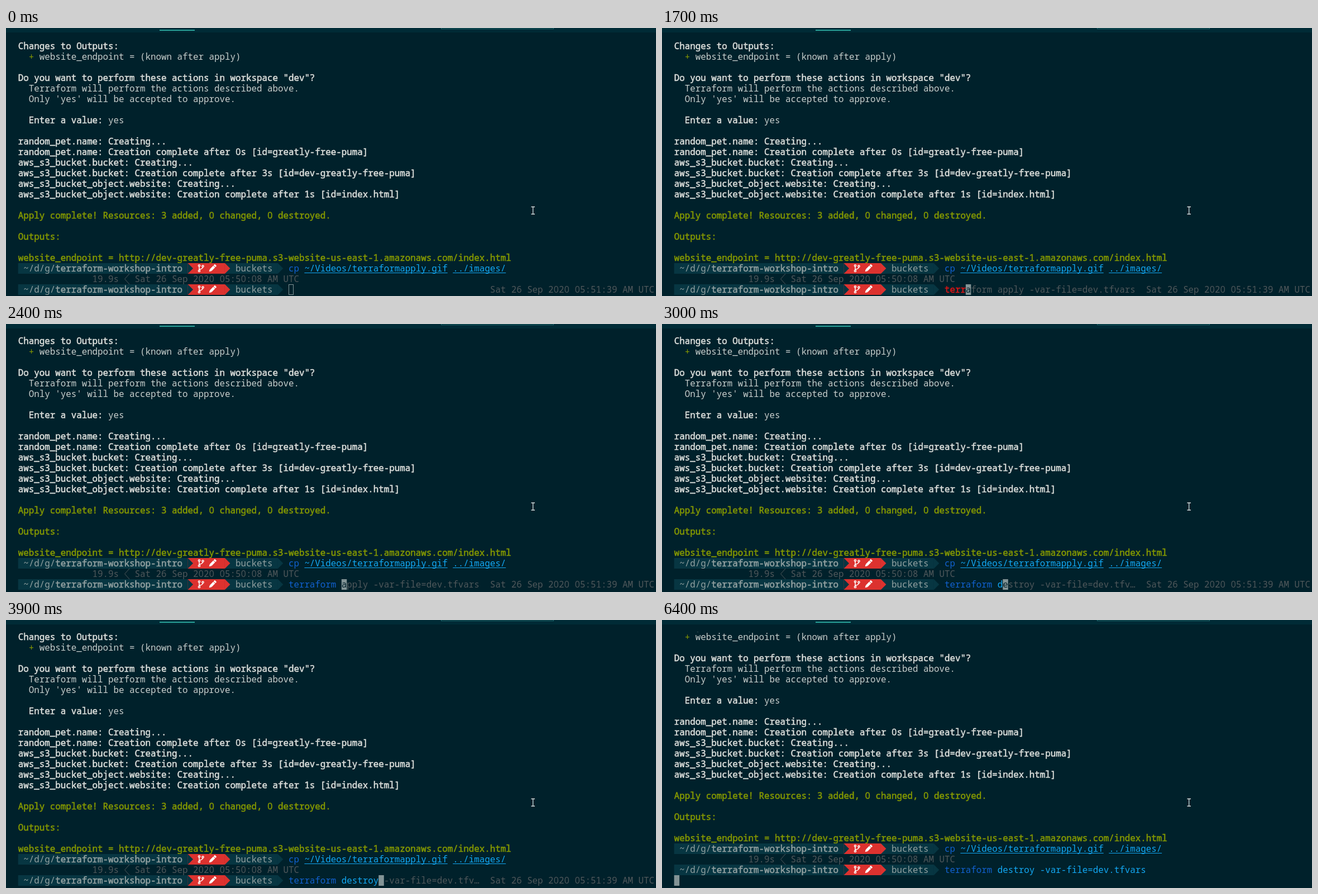
An HTML page with a canvas for the animation above (8 s loop, 1164 by 481 pixels).

```html
<!DOCTYPE html>
<html lang="en">
<head>
<meta charset="utf-8">
<title>Terminal</title>
<style>
  html, body { margin: 0; width: 100%; height: 100%; overflow: hidden; background: #00212b; }
  canvas { display: block; }
</style>
</head>
<body>
<canvas id="stage" width="1164" height="481"></canvas>
<script>
const ctx = document.getElementById('stage').getContext('2d');
const LOOP = 8000, LEFT = 21.7, CELL = 9.494, ROW = 19, BASELINE = 15;
const SIZE = CELL / 0.6;
const COLOR = {
  back: '#00212b', bar: '#002b36', teal: '#2aa198', text: '#c9cfcd', bold: '#dcdedb',
  green: '#859900', segment: '#073642', path: '#93a1a1', red: '#dc322f', white: '#ffffff',
  command: '#1161d0', argument: '#12a8f4', error: '#dc1414', dim: '#50585b', cursor: '#839496'
};
const STAMP = 'Sat 26 Sep 2020 05:51:39 AM UTC';
const APPLY = 'terraform apply -var-file=dev.tfvars';
const DESTROY = 'terraform destroy -var-file=dev.tfvars';
const SHORT_DESTROY = 'terraform destroy -var-file=dev.tfv…';

const OUTPUT = [
  ['bold', 'Changes to Outputs:'],
  ['text', '    website_endpoint = (known after apply)'],
  [],
  ['bold', 'Do you want to perform these actions in workspace "dev"?'],
  ['text', '  Terraform will perform the actions described above.'],
  ['text', "  Only 'yes' will be accepted to approve."],
  [],
  ['bold', '  Enter a value:'],
  [],
  ['bold', 'random_pet.name: Creating...'],
  ['bold', 'random_pet.name: Creation complete after 0s [id=greatly-free-puma]'],
  ['bold', 'aws_s3_bucket.bucket: Creating...'],
  ['bold', 'aws_s3_bucket.bucket: Creation complete after 3s [id=dev-greatly-free-puma]'],
  ['bold', 'aws_s3_bucket_object.website: Creating...'],
  ['bold', 'aws_s3_bucket_object.website: Creation complete after 1s [id=index.html]'],
  [],
  ['green', 'Apply complete! Resources: 3 added, 0 changed, 0 destroyed.'],
  [],
  ['green', 'Outputs:'],
  [],
  ['green', 'website_endpoint = http://dev-greatly-free-puma.s3-website-us-east-1.amazonaws.com/index.html']
];

// [time, number of typed characters]
const TYPING = [[0, 0], [1000, 1], [1400, 2], [1500, 3], [1700, 4], [1800, 5], [1900, 6],
  [2100, 7], [2200, 8], [2300, 9], [2400, 10], [3000, 11], [3400, 14], [3600, 15],
  [3700, 16], [3900, 17], [4600, 38]];

const colX = col => LEFT + col * CELL;
const rowY = row => 23 + row * ROW;

function rect(x, y, w, h, color) {
  ctx.fillStyle = color;
  ctx.fillRect(x, y, w, h);
}

// The zero is plain, so it comes from a face without a slash.
function write(text, col, row, color, bold = false) {
  ctx.fillStyle = ctx.strokeStyle = color;
  ctx.lineWidth = 0.55;
  ctx.textAlign = 'center';
  [...text].forEach((char, i) => {
    ctx.font = `${SIZE}px ${char === '0' ? '"Open Sans", sans-serif' : '"Noto Sans Mono", monospace'}`;
    const x = colX(col + i + 0.5), y = rowY(row) + BASELINE;
    ctx.fillText(char, x, y);
    if (bold) ctx.strokeText(char, x, y);
  });
}

function link(text, col, row) {
  write(text, col, row, COLOR.argument);
  rect(colX(col), rowY(row) + 17, text.length * CELL, 1, COLOR.argument);
}

function arrowTip(col, row, color) {
  const x = colX(col), y = rowY(row);
  ctx.fillStyle = color;
  ctx.beginPath();
  ctx.moveTo(x, y);
  ctx.lineTo(x + CELL, y + ROW / 2);
  ctx.lineTo(x, y + ROW);
  ctx.fill();
}

function segment(from, to, row, color) {
  rect(colX(from), rowY(row), (to - from) * CELL, ROW, color);
}

function icons(row) {
  ctx.save();
  ctx.translate(349, rowY(row) + 9);
  ctx.strokeStyle = ctx.fillStyle = COLOR.white;
  ctx.lineWidth = 1.5;
  ctx.beginPath();
  ctx.moveTo(-3, -3);
  ctx.lineTo(-3, 4);
  ctx.moveTo(3.5, -2);
  ctx.quadraticCurveTo(3.5, 1, -3, 2.5);
  ctx.stroke();
  for (const [x, y] of [[-3, -4.5], [3.5, -3.5], [-3, 5]]) {
    ctx.beginPath();
    ctx.arc(x, y, 1.6, 0, 7);
    ctx.stroke();
  }
  ctx.translate(370, 0);
  ctx.translate(-349, 0);
  ctx.rotate(-Math.PI / 4);
  ctx.fillRect(-5, -2.3, 9, 4.6);
  ctx.fillRect(4.8, -2.3, 3, 4.6);
  ctx.beginPath();
  ctx.moveTo(-5, -2.3);
  ctx.lineTo(-9, 0);
  ctx.lineTo(-5, 2.3);
  ctx.fill();
  ctx.restore();
}

function prompt(row) {
  segment(0, 32, row, COLOR.segment);
  segment(32, 39, row, COLOR.red);
  arrowTip(32, row, COLOR.segment);
  segment(39, 49, row, COLOR.segment);
  arrowTip(39, row, COLOR.red);
  arrowTip(49, row, COLOR.segment);
  write('~/d/g/', 1, row, COLOR.path);
  write('terraform-workshop-intro', 7, row, COLOR.path, true);
  write('buckets', 41, row, COLOR.path);
  icons(row);
}

function cursor(col, row) {
  rect(colX(col), rowY(row), CELL, ROW, COLOR.cursor);
}

function commandLine(time, row) {
  const typed = TYPING.filter(([start]) => time >= start).pop()[1];
  const full = typed > 16 || typed === 38 ? DESTROY : APPLY;
  const line = typed > 10 ? DESTROY : full;
  const hint = typed > 10 ? SHORT_DESTROY : APPLY;

  if (time < 4600) write(STAMP, 89, row, COLOR.dim);
  if (typed > 0) {
    write(line.slice(0, Math.min(typed, 9)), 51, row, typed < 9 ? COLOR.error : COLOR.command, typed < 9);
    write(line.slice(9, typed), 60, row, COLOR.argument);
    if (typed < 38) write(hint.slice(typed), 51 + typed, row, COLOR.dim);
  }
  if (time >= 6400) return;
  if (time < 400) {
    ctx.strokeStyle = COLOR.cursor;
    ctx.lineWidth = 1;
    ctx.strokeRect(506.5, rowY(row) + 0.5, 8, 18);
    return;
  }
  cursor(51 + typed, row);
  if (typed && typed < 38) write(hint[typed], 51 + typed, row, COLOR.back);
}

function mousePointer() {
  ctx.strokeStyle = '#d5dadb';
  ctx.lineWidth = 1.3;
  ctx.beginPath();
  ctx.moveTo(940.5, 321);
  ctx.lineTo(947, 321);
  ctx.moveTo(943.7, 321);
  ctx.lineTo(943.7, 334);
  ctx.moveTo(940.5, 334);
  ctx.lineTo(947, 334);
  ctx.stroke();
}

function drawTerminal(time) {
  OUTPUT.forEach(([style, text], row) => {
    if (text) write(text, 0, row, COLOR[style], style !== 'text');
  });
  write('+', 2, 1, COLOR.green);
  write('yes', 17, 7, COLOR.text);

  prompt(21);
  write('cp', 51, 21, COLOR.command);
  link('~/Videos/terraformapply.gif', 54, 21);
  link('../images/', 82, 21);

  write('19.9s', 14, 22, COLOR.dim);
  write('Sat 26 Sep 2020 05:50:08 AM UTC', 22, 22, COLOR.dim);
  ctx.strokeStyle = COLOR.dim;
  ctx.lineWidth = 1;
  ctx.beginPath();
  ctx.moveTo(colX(21), rowY(22));
  ctx.lineTo(colX(20) + 1, rowY(22) + ROW / 2);
  ctx.lineTo(colX(21), rowY(22) + ROW);
  ctx.stroke();

  prompt(23);
  commandLine(time, 23);
  if (time >= 6400) cursor(0, 24);
}

function draw(now) {
  const time = now % LOOP;
  const scroll = time < 2400 ? 0 : time < 6400 ? 1.5 : 20.5;
  rect(0, 0, 1164, 481, COLOR.back);
  ctx.save();
  ctx.beginPath();
  ctx.rect(0, time < 6400 ? 8 : 21, 1164, 473);
  ctx.clip();
  ctx.translate(0, -Math.round(scroll));
  drawTerminal(time);
  ctx.restore();

  rect(0, 0, 1164, 8, COLOR.bar);
  rect(275, 3, 63, 2, COLOR.teal);
  rect(779, 0, 202, 2, '#1c6a70');
  rect(780, 0, 200, 1, COLOR.back);
  mousePointer();
  requestAnimationFrame(draw);
}
requestAnimationFrame(draw);
</script>
</body>
</html>
```
